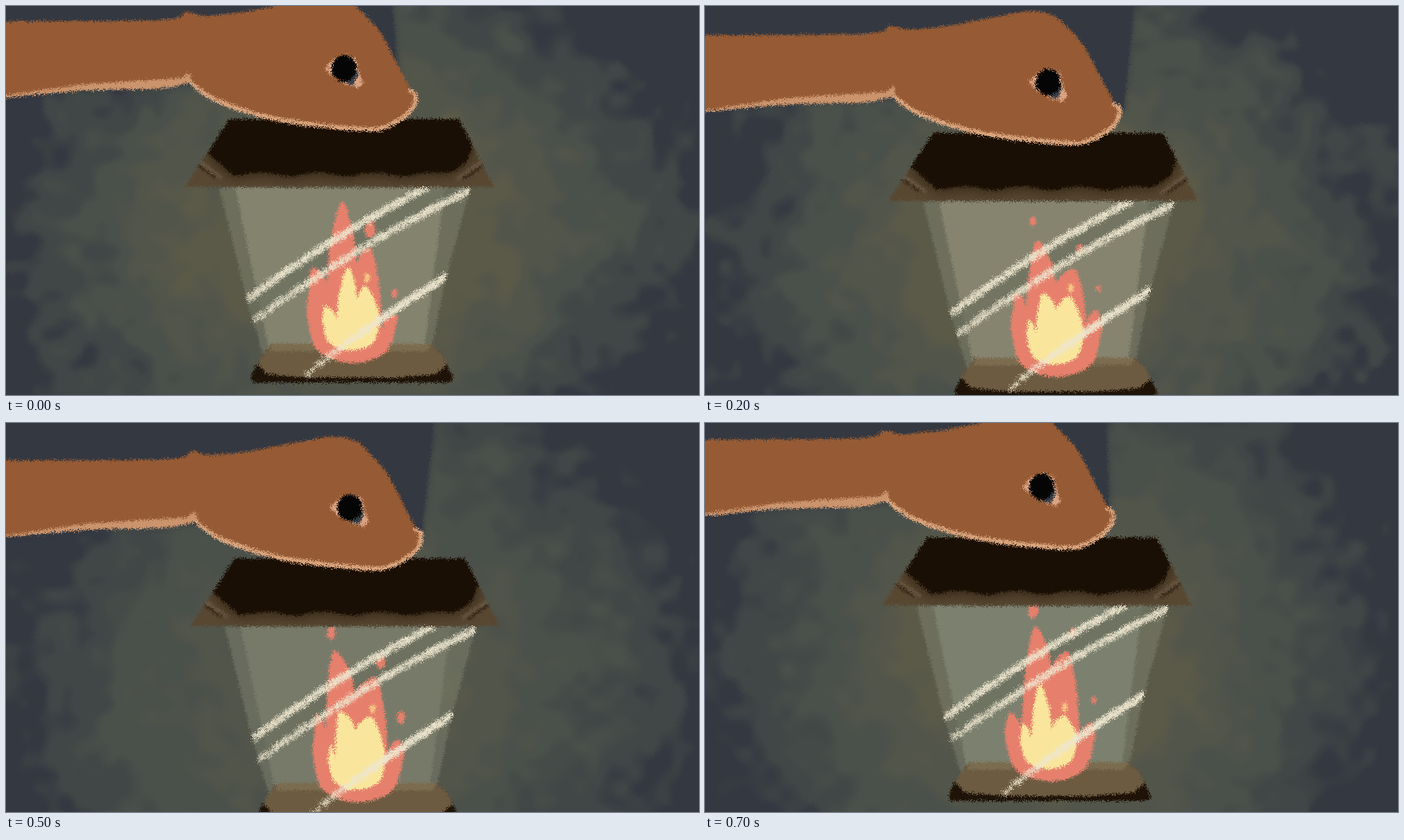
Recreate the animation shown at these times as an HTML page with a canvas. Size 998 by 561 pixels, loop 0.8 s.

```html
<!DOCTYPE html>
<html lang="en">
<head>
<meta charset="utf-8">
<title>Lantern</title>
<style>
html, body { margin: 0; height: 100%; overflow: hidden; background: #343841; }
canvas { display: block; }
</style>
</head>
<body>
<canvas id="stage" width="998" height="561"></canvas>
<script>
const W = 998, H = 561, STEP = 100;
const stage = document.getElementById('stage').getContext('2d');

// Camera drift, flame pose and glass tint of each step
const drift = [[0, 0], [2, 8], [7, 20], [16, 39], [14, 42], [8, 32], [0, 14], [-2, 2]];
const poses = [0, .5, 1, 2, 2.5, 3, 4, 5];
const tints = ['#83836e', '#848470', '#86846f', '#7d7f6b', '#7a7c6a', '#787a69', '#88866f', '#7c806e'];

// Each glow lasts two steps; edge is the side of the hand's shadow
const glows = [
  { gain: 6, mottle: 4, edge: [556, 568] },
  { gain: 5.8, mottle: 4, edge: [609, 596] },
  { gain: 4.6, mottle: 3, edge: [605, 590] },
  { gain: 6, mottle: 3, edge: [580, 584] }
];
const shades = [[52, 56, 65], [64, 71, 70], [74, 80, 74], [82, 85, 74], [91, 90, 73]];

// Flame poses: x of the main tongue, then the heights of the tongues
const flames = [
  { x: 484, red: [378, 283, 350, 445], gold: [376, 404] },
  { x: 471, red: [393, 318, 360, 418], gold: [395, 399] },
  { x: 468, red: [396, 312, 352, 410], gold: [391, 407] },
  { x: 464, red: [388, 297, 337, 424], gold: [384, 392] },
  { x: 473, red: [376, 288, 346, 422], gold: [374, 397] },
  { x: 476, red: [416, 292, 330, 430], gold: [374, 420] }
];

const mix = (a, b, t) => a + (b - a) * t;
const clamp = (v, lo, hi) => Math.max(lo, Math.min(hi, v));
const points = s => s.split(' ').map(p => p.split(',').map(Number));

function random(seed) {
  let s = seed * 7919 + 12345;
  return () => ((s = (Math.imul(s, 1664525) + 1013904223) >>> 0) / 4294967296);
}

function layer(w, h) {
  const c = document.createElement('canvas');
  c.width = w; c.height = h;
  return c.getContext('2d', { willReadFrequently: true });
}

const lid = points('322,163 652,163 703,261 257,261');
const glass = points('307,262 669,262 634,390 612,495 620,541 365,541 371,505 347,425');
const pane = points('330,262 632,262 602,495 379,495');
const base = points('383,487 612,487 628,502 644,536 640,543 356,543 352,535 367,507');
const arm = points('-200,22 0,22 222,20 260,9 285,14 340,9 400,-2 458,-12 493,-7 512,8 540,40 572,100');
const palm = points('582,118 592,126 590,145 575,162 545,178 520,181 460,176 400,168 350,156 300,138 272,120 262,112');
const hand = [...arm, ...palm, ...points('220,119 110,122 0,132 -200,150')];
const wrist = points('-20,132 110,113 253,104 265,95 270,118 220,122 110,126 -20,138');
const hole = points('459,90 473,76 490,70 505,77 508,95 514,110 508,118 490,113 470,101');

function poly(c, pts, color) {
  c.beginPath();
  pts.forEach(p => c.lineTo(...p));
  c.closePath();
  if (color) { c.fillStyle = color; c.fill(); }
}

// Smooth curve through the points
function curve(c, pts, closed = true) {
  const n = pts.length;
  const at = i => closed ? pts[(i + n) % n] : pts[clamp(i, 0, n - 1)];
  c.beginPath();
  c.moveTo(...pts[0]);
  for (let i = 0; i < (closed ? n : n - 1); i++) {
    const [a, b, d, e] = [at(i - 1), at(i), at(i + 1), at(i + 2)];
    c.bezierCurveTo(b[0] + (d[0] - a[0]) / 6, b[1] + (d[1] - a[1]) / 6,
      d[0] - (e[0] - b[0]) / 6, d[1] - (e[1] - b[1]) / 6, d[0], d[1]);
  }
}

function blob(c, pts, color) {
  curve(c, pts);
  c.fillStyle = color;
  c.fill();
}

function oval(c, x, y, rx, ry, color) {
  c.beginPath();
  c.ellipse(x, y, rx, ry, .1, 0, 7);
  c.fillStyle = color;
  c.fill();
}

function line(c, width, color, ...pts) {
  c.beginPath();
  pts.forEach(p => c.lineTo(...p));
  c.lineWidth = width;
  c.strokeStyle = color;
  c.stroke();
}

// Cloudy noise: small random pictures enlarged over each other
function clouds(w, h, seed) {
  const out = layer(w, h), rnd = random(seed);
  out.imageSmoothingQuality = 'high';
  [[90, 1], [44, .5], [20, .38]].forEach(([cell, alpha]) => {
    const cols = Math.ceil(w / cell) + 2, rows = Math.ceil(h / cell) + 2;
    const small = layer(cols, rows), img = small.createImageData(cols, rows);
    for (let i = 0; i < img.data.length; i++) img.data[i] = i % 4 === 3 ? 255 : rnd() * 256;
    small.putImageData(img, 0, 0);
    out.globalAlpha = alpha;
    out.drawImage(small.canvas, -cell / 2, -cell / 2, cols * cell, rows * cell);
  });
  return out.getImageData(0, 0, w, h).data;
}

// Painted glow, larger than the stage so that it can drift
const PADX = 20, PADY = 45;
function paintGlow({ gain, mottle, edge }, index) {
  const w = W + 22, h = H + 49, c = layer(w, h);
  const img = c.createImageData(w, h), noise = clouds(w, h, index + 3);
  for (let y = 0, i = 0; y < h; y++) for (let x = 0; x < w; x++, i += 4) {
    const d = Math.hypot((x - PADX - 490) / 480, (y - PADY - 330) / 425);
    const level = gain * (1 - d) + .2 + (noise[i] / 255 - .5) * mottle * Math.min(1, .35 + d * .6);
    const v = clamp(level, 0, 3.999), k = Math.floor(v), t = clamp((v - k - .2) / .6, 0, 1);
    for (let j = 0; j < 3; j++) img.data[i + j] = mix(shades[k][j], shades[k + 1][j], t);
    img.data[i + 3] = 255;
  }
  c.putImageData(img, 0, 0);
  c.translate(PADX, PADY);
  c.shadowColor = '#343841';
  c.shadowBlur = 10;
  poly(c, [[-60, -60], [edge[0] + 4, -60], [edge[0], 0], [edge[1], 130], [480, 150], [270, 112], [-60, 130]], '#343841');
  return c.canvas;
}

// Round-bottomed flame whose tongues swell from the valleys between them
function flameShape(tips, cx, half, bottom) {
  const valleys = [[cx - half, bottom - half]];
  tips.slice(1).forEach(([x, y], i) =>
    valleys.push([mix(tips[i][0], x, .5), Math.max(tips[i][1], y) + 18]));
  valleys.push([cx + half, bottom - half]);
  const shoulder = (tip, v) => [mix(tip[0], v[0], .75), mix(tip[1], v[1], .5)];
  const shape = [[cx, bottom], [cx - half * .76, bottom - half * .26], valleys[0]];
  tips.forEach((tip, i) => shape.push(shoulder(tip, valleys[i]), tip, shoulder(tip, valleys[i + 1]), valleys[i + 1]));
  return [...shape, [cx + half * .76, bottom - half * .26]];
}

function drawFire(c, pose) {
  const a = flames[Math.floor(pose)], b = flames[Math.ceil(pose)], t = pose % 1;
  const rnd = random(Math.ceil(pose * 2) + 2), x = mix(a.x, b.x, t);
  const tips = key => a[key].map((y, i) => mix(y, b[key][i], t));
  const red = tips('red').map((y, i) => [[440, x, 526, 558][i], y]);
  const gold = tips('gold').map((y, i) => [[x + 8, 519][i], y]);
  const color = '#e6806c';
  blob(c, flameShape(red, 499, 65, 515), color);
  red.slice(1).forEach(([sx, sy]) => {
    const r = 3 + rnd() * 5;
    oval(c, sx + (rnd() - .5) * 16, sy - 24 - rnd() * 10, r, r * 1.6, color);
  });
  blob(c, flameShape([[460, 432], ...gold], 497, 41, 497), '#f9e69c');
  oval(c, 520, gold[1][1] - 12, 4, 7, '#f5c583');
}

// Chalk line: dots scattered along a quadratic curve
function streak(c, [x0, y0], [x1, y1], [x2, y2], fade, rnd) {
  c.fillStyle = 'rgba(238,231,208,.55)';
  for (let i = 0; i < 2300; i++) {
    const t = rnd(), u = 1 - t, off = (rnd() + rnd() - 1) * 7;
    if (rnd() > fade + t * 1.5) continue;
    const x = u * u * x0 + 2 * u * t * x1 + t * t * x2 + off * .55;
    const y = u * u * y0 + 2 * u * t * y1 + t * t * y2 + off * .84;
    c.fillRect(x - 1, y - 1, 2, 2);
  }
}

function drawGlass(c, step) {
  const rnd = random(5);
  poly(c, glass, 'rgba(134,138,120,.42)');
  poly(c, pane, tints[step]);

  c.save();
  poly(c, base, '#1f1307');
  c.clip();
  poly(c, points('340,480 650,480 634,518 620,531 560,536 430,536 376,531 364,518'), '#6c5b41');
  poly(c, points('383,487 612,487 606,498 380,498'), '#7b6c50');
  c.restore();

  c.save();
  poly(c, glass);
  c.clip();
  c.beginPath();
  c.moveTo(347, 425);
  c.quadraticCurveTo(468, 333, 605, 262);
  c.lineTo(669, 266);
  c.quadraticCurveTo(520, 335, 355, 455);
  c.fillStyle = 'rgba(104,107,90,.6)';
  c.fill();
  drawFire(c, poses[step]);
  streak(c, [345, 425], [468, 333], [608, 261], .7, rnd);
  streak(c, [353, 456], [520, 335], [672, 264], .6, rnd);
  streak(c, [430, 533], [537, 449], [638, 388], .2, rnd);
  c.restore();
}

function drawLid(c) {
  const soot = [[290, 212], [322, 160], [655, 160], [672, 200]];
  for (let x = 664; x >= 300; x -= 14) {
    const corner = Math.max(0, 30 - Math.min(x - 300, 664 - x)) * .7;
    soot.push([x, 247 - corner - 7 * Math.abs(Math.sin(x / 26))]);
  }
  c.save();
  poly(c, lid, '#584832');
  c.clip();
  line(c, 5, '#6b5944', [274, 222], [312, 248]);
  line(c, 5, '#6b5944', [692, 220], [648, 250]);
  line(c, 4, '#3c2d1c', [690, 228], [658, 250]);
  line(c, 4, '#3c2d1c', [277, 230], [302, 248]);
  c.shadowColor = '#25180a';
  c.shadowBlur = 22;
  poly(c, soot, '#1a0f04');
  c.restore();
}

function drawHand(c) {
  c.save();
  blob(c, hand, '#965b34');
  c.clip();
  poly(c, wrist, '#cb946d');
  curve(c, palm, false);
  c.lineWidth = 12;
  c.strokeStyle = '#d9a47d';
  c.stroke();
  c.restore();
  poly(c, hole, '#dba383');
  poly(c, points('468,94 478,78 502,78 507,100 500,115 480,107'), '#3a4148');
  oval(c, 487, 90, 18, 19, '#050505');
}

// Scatter every pixel a little for the dry-brush edges
function scatter(c, spread) {
  const src = c.getImageData(0, 0, W, H), out = c.createImageData(W, H);
  const from = new Uint32Array(src.data.buffer), to = new Uint32Array(out.data.buffer);
  const rnd = random(11), shift = () => Math.round((rnd() + rnd() - 1) * spread);
  for (let y = 0, i = 0; y < H; y++) for (let x = 0; x < W; x++, i++)
    to[i] = from[clamp(y + shift(), 0, H - 1) * W + clamp(x + shift(), 0, W - 1)];
  c.putImageData(out, 0, 0);
}

const backdrops = glows.map(paintGlow);
const frames = drift.map(([dx, dy], step) => {
  const c = layer(W, H);
  c.translate(dx, dy);
  c.drawImage(backdrops[step >> 1], -PADX, -PADY);
  drawGlass(c, step);
  drawLid(c);
  drawHand(c);
  scatter(c, 4);
  return c.canvas;
});

function play() {
  const step = Math.floor(performance.now() / STEP) % frames.length;
  stage.drawImage(frames[step], 0, 0);
  requestAnimationFrame(play);
}
play();
</script>
</body>
</html>
```
